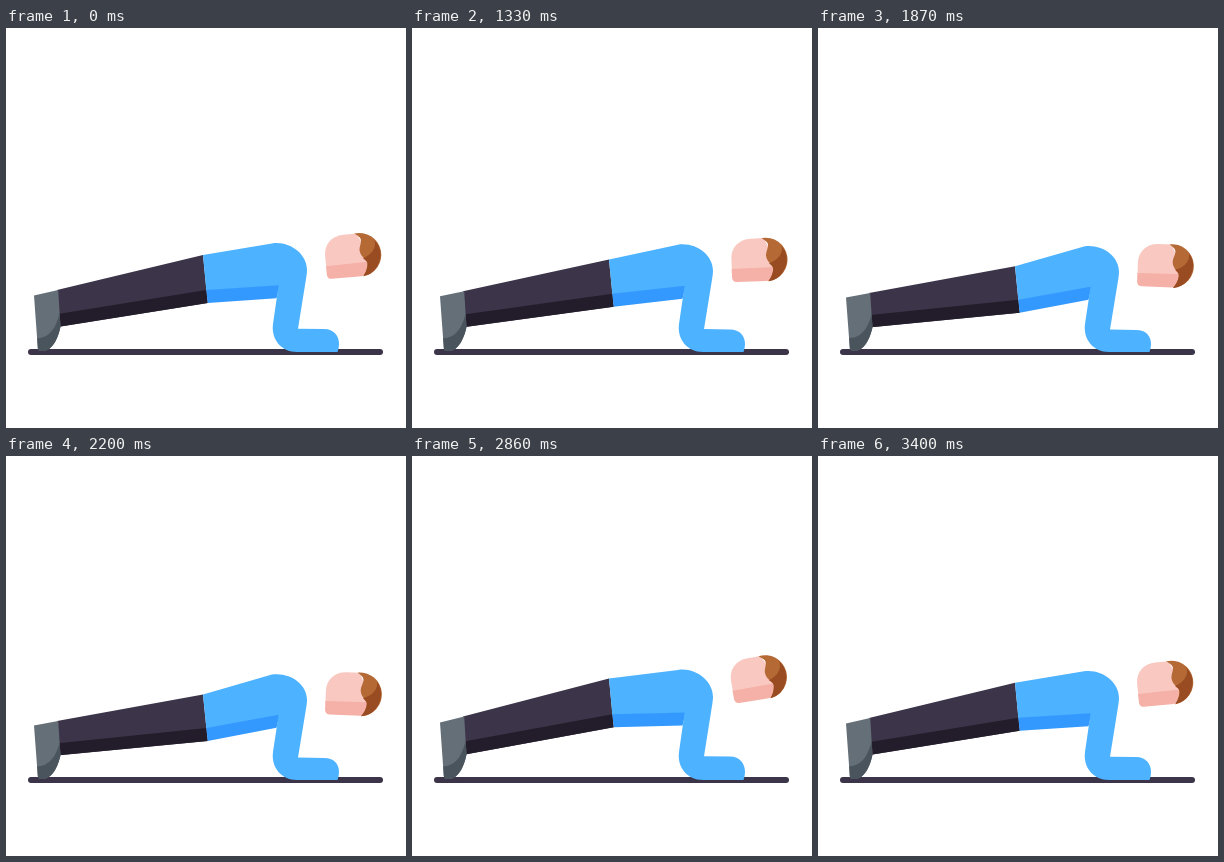
Recreate the animation shown at these times as an HTML page. Size 400 by 400 pixels, loop 3430 ms.

```html
<!DOCTYPE html>
<html lang="en">
<head>
<meta charset="utf-8">
<title>Plank push</title>
<style>
  html, body { margin: 0; width: 100%; height: 100%; overflow: hidden; background: #fff; }
  svg { display: block; width: 100vw; height: 100vh; }
</style>
</head>
<body>
<svg viewBox="0 0 400 400">
  <path d="M25 324H374" stroke="#3c3448" stroke-width="6" stroke-linecap="round"/>
  <path id="legs" fill="#3c3448"/>
  <path id="legShade" fill="#231d2b"/>
  <path id="shoe" fill="#646f78"/>
  <path id="shoeShade" fill="#4a545d"/>
  <path id="belly" fill="#3399ff"/>
  <path id="torso" fill="#4db2ff"/>
  <g id="head">
    <path fill="#f9c9c1" d="M-33.3 9V-2C-33.3 -14 -25 -21.7 -13 -21.7H0L10 0V9Z"/>
    <path fill="#f5b1a7" d="M-33.5 7.7H8V14Q7 21.4 1 21.4L-29 20.9Q-33.5 20.8 -33.5 16Z"/>
    <path fill="#b56a36" d="M-2 -21.8A21.9 21.9 0 1 1 2.5 21.75C5 19 8 14 8 9C8 5 2 3 1.5 -4C1.3 -8 4 -11 4 -14.5C4 -18 1 -19 -2 -21.8Z"/>
    <path fill="#994b22" d="M17.5 -13.2A21.9 21.9 0 0 1 2.5 21.75C5 19 8 14 8 9C8 7 6 5.5 4.2 3.6C13 1 19 -5 17.5 -13.2Z"/>
  </g>
</svg>
<script>
const LOOP = 3430, HOLD = 1030, STEP = 30;
const CYCLE = LOOP - HOLD;
const LOW = 2135, HIGH = 2695;   // times of the lowest and highest pose
const DOWN = 12, UP = -6;        // vertical reach at those poses

const el = id => document.getElementById(id);
const ease = u => (1 - Math.cos(Math.PI * u)) / 2;
const mix = (a, b, u) => a + (b - a) * ease(u);

// slow lowering that runs across the loop seam, then a quick push up
function drop(t) {
  if (t < HOLD) return 0;
  t -= (t - HOLD) % STEP;
  if (t >= LOW && t < HIGH) return mix(DOWN, UP, (t - LOW) / (HIGH - LOW));
  const since = t >= HIGH ? t - HIGH : t + CYCLE - HIGH;
  return mix(UP, DOWN, since / (LOW + CYCLE - HIGH));
}

function pose(s) {
  const draw = (id, d) => el(id).setAttribute("d", d);
  const hip = s * (0.86 + 0.013 * s);
  const hipTop = 227 + hip;
  const hipMid = 262 + 0.87 * hip;
  const hipLow = 275 + 0.87 * hip;
  const ankle = 262 + 0.26 * s;
  const heel = 298.8 + 0.05 * s;
  const sole = 286 + 0.1 * s;
  const back = 215.4 + 0.27 * s;
  const side = 242 + 0.17 * s;
  const pit = 257.3 + 0.12 * s;
  const wrist = 300.7 + 0.08 * s;

  draw("legs", `M51 ${ankle}L197 ${hipTop}L201.7 ${hipLow}L53 ${heel}Z`);
  draw("legShade", `M52 ${sole}L200.3 ${hipMid}L201.7 ${hipLow}L53 ${heel}Z`);
  draw("shoe", `M28 ${267.5 + 0.17 * s}L52.2 ${ankle}L54.5 ${heel}C52 311 46 323 37 323H35Q32 323 31.8 320Z`);
  draw("shoeShade", `M53.6 ${sole - 1}C49 305 40 310 31.2 310.3L31.8 320Q32 323 35 323H37C46 323 52 311 54.5 ${heel}Z`);
  draw("belly", `M200.2 ${hipMid - 1}L274 ${pit - 1}L270.5 ${pit + 13}L201.7 ${hipLow}Z`);
  draw("torso", `M197 ${hipTop}L266 ${back}C284 ${back - 2.5} 301 ${side - 16} 301 ${side}` +
    `Q301 ${side + 3} 300.3 ${side + 7}L292 ${wrist}L318 ${wrist + 0.3}` +
    `C328 ${wrist + 0.3} 333 308 333 316Q333 320 331.5 324H291` +
    `C275 324 265 311 267 296L272.6 ${pit}L200.3 ${hipMid}Z`);
  el("head").setAttribute("transform", `translate(${352.5 + 0.05 * s} ${227 + s}) rotate(${0.68 * s - 6})`);
}

const start = performance.now();
function tick() {
  pose(drop((performance.now() - start) % LOOP));
  requestAnimationFrame(tick);
}
tick();
</script>
</body>
</html>
```
